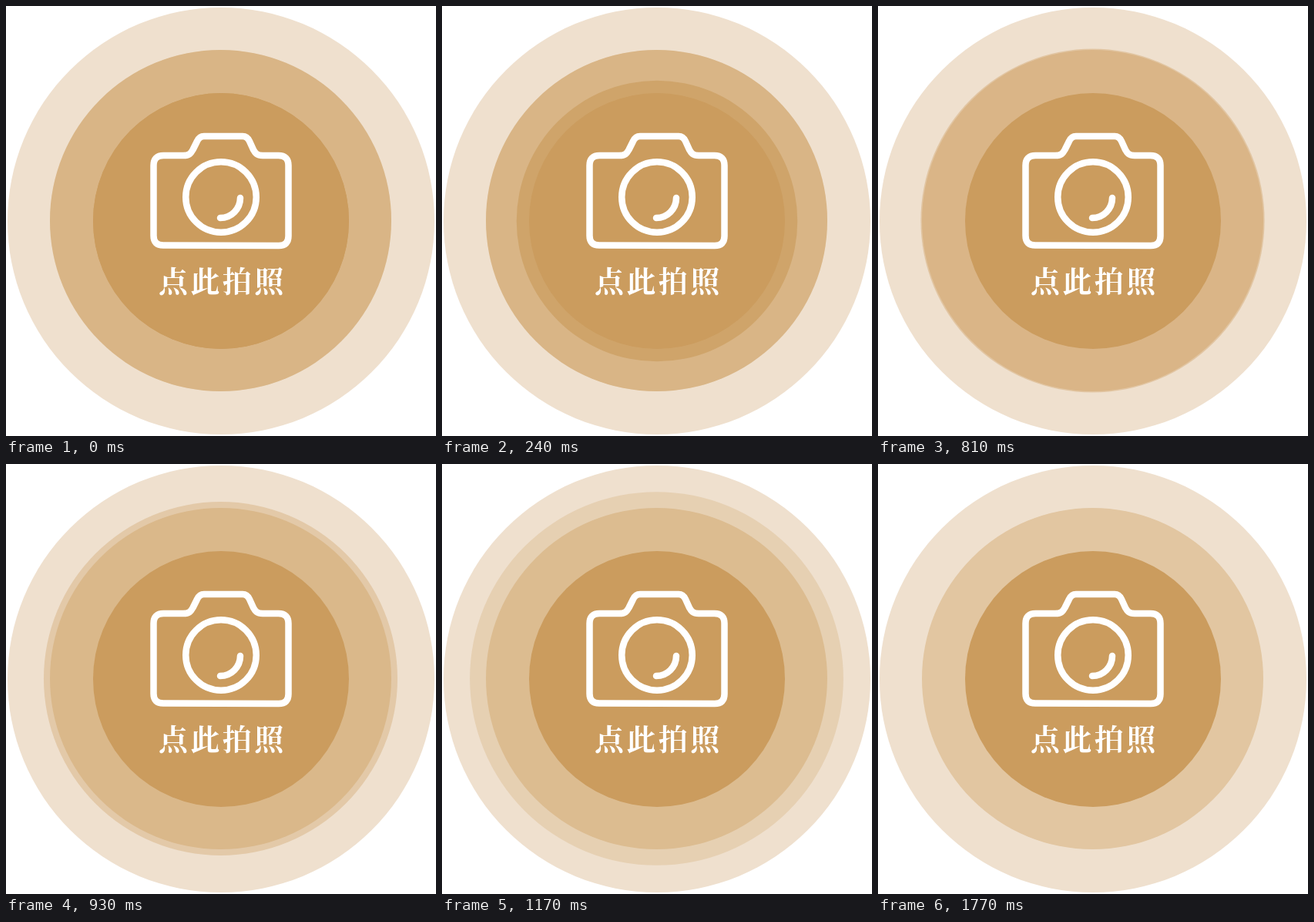
Write an HTML page with a canvas that moves like this. It is 558x558 px and loops after 1.8 s.

```html
<!DOCTYPE html>
<html lang="zh-CN">
<head>
<meta charset="utf-8">
<title>点此拍照</title>
<style>
  html, body { margin: 0; width: 100%; height: 100%; overflow: hidden; background: #fff; }
  canvas { display: block; width: 558px; height: 558px; }
</style>
</head>
<body>
<canvas id="stage" width="558" height="558"></canvas>
<script>
const ctx = document.getElementById('stage').getContext('2d');
const LOOP = 1800;
const STEP = 30;
const GOLD = '#cb9c5e';
const FONT = '700 38px "Noto Serif CJK SC", "Noto Serif SC", "Noto Sans CJK SC", "Noto Sans CJK", serif';

const body = new Path2D(
  'M191.5 207 Q191.5 194 204.5 194 H230 C238 194 240 191 242.5 186.5' +
  ' L248 175.5 Q251 169 257 169 H307 Q313 169 316 175.5' +
  ' L321 186.5 C323.5 191 325.5 194 333 194 H353.5 Q366.5 194 366.5 207' +
  ' V298.5 Q366.5 311 354 311 L204 310.5 Q191.5 310.5 191.5 298 Z');

const clamp01 = v => Math.min(1, Math.max(0, v));
const mix = (a, b, p) => a + (b - a) * p;

function disc(center, radius, color, alpha = 1) {
  ctx.globalAlpha = alpha;
  ctx.fillStyle = color;
  ctx.beginPath();
  ctx.arc(center, center, radius, 0, Math.PI * 2);
  ctx.fill();
  ctx.globalAlpha = 1;
}

function strokeArc(x, y, radius, from, to) {
  ctx.beginPath();
  ctx.arc(x, y, radius, from, to);
  ctx.stroke();
}

function camera() {
  ctx.strokeStyle = '#fff';
  ctx.lineWidth = 8.5;
  ctx.lineCap = ctx.lineJoin = 'round';
  ctx.stroke(body);
  strokeArc(279, 248, 45.75, 0, Math.PI * 2);
  strokeArc(278, 249, 26, 0, Math.PI / 2);
}

function label() {
  ctx.font = FONT;
  ctx.fillStyle = '#fff';
  ctx.textAlign = 'center';
  ctx.textBaseline = 'alphabetic';
  [...'点此拍照'].forEach((ch, i) => ctx.fillText(ch, 217 + i * 41.4, 370.5));
}

function draw(t) {
  ctx.fillStyle = '#fff';
  ctx.fillRect(0, 0, 558, 558);
  disc(279, 277, '#efe0ce');
  disc(278.5, 221.5, '#e2c6a1');

  // The wide pulse waits under the middle ring, then spreads and fades.
  if (t < 1770) {
    const p = clamp01((t - 780) / 630);
    disc(278.5, mix(221.5, 255.2, p), GOLD, mix(0.4, 0.15, p));
  }
  // The near pulse leaves the button first.
  if (t < 780) {
    const p = clamp01(t / 450);
    disc(279, mix(166, 196.5, p), GOLD, mix(1, 0.4, p));
  }

  disc(279, 166, GOLD);
  camera();
  label();
}

const start = performance.now();
function frame() {
  const t = (performance.now() - start) % LOOP;
  draw(Math.floor(t / STEP) * STEP);
  requestAnimationFrame(frame);
}
frame();
</script>
</body>
</html>
```
